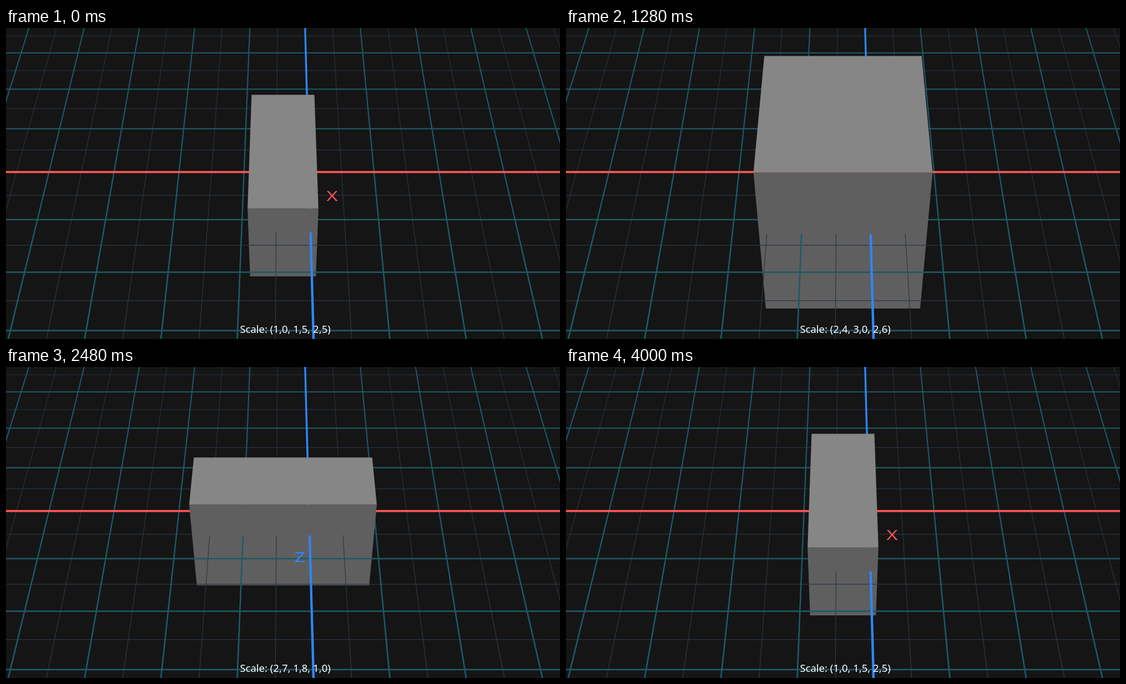
Recreate the animation shown at these times as an HTML page with a canvas. Size 998x561 px, loop 4040 ms.

```html
<!DOCTYPE html>
<html lang="en">
<head>
<meta charset="utf-8">
<title>Scaling box</title>
<style>
html, body { margin: 0; width: 100%; height: 100%; overflow: hidden; background: #151515; }
canvas { display: block; }
</style>
</head>
<body>
<canvas id="stage" width="998" height="561"></canvas>
<script>
const W = 998, H = 561, STEP = 40, STEPS = 101, PERIOD = 4000;
const ctx = document.getElementById('stage').getContext('2d');
const FONT = '"Noto Sans", "Open Sans", sans-serif';
const TEAL = '#1d5a65', THIN = '#2b3748', RED = '#ff5454', BLUE = '#2f86ff';

// Camera: pitched down 45 degrees, aimed at the ground point (0, 0, 0.5)
const FOCAL = 1751.3, DIST = 29.56, AIM_Z = 0.5;
const AXIS_X = 0.8, BOX_Y = -0.5;

function project(x, y, z) {
  const dz = z - AIM_Z;
  const k = FOCAL / (DIST - Math.SQRT1_2 * (y + dz));
  return { x: W / 2 + x * k, y: H / 2 - Math.SQRT1_2 * (y - dz) * k, k };
}

function trace(points) {
  ctx.beginPath();
  for (const p of points) ctx.lineTo(p.x, p.y);
  ctx.closePath();
}

function fill(points, color) {
  trace(points);
  ctx.fillStyle = color;
  ctx.fill();
}

// Ground lines; widths are world units
function lineAlongX(z, width, color) {
  const p = project(0, 0, z), h = width * p.k;
  ctx.fillStyle = color;
  ctx.fillRect(0, p.y - h / 2, W, h);
}

function lineAlongZ(x, width, color) {
  const h = width / 2;
  fill([project(x - h, 0, -9), project(x + h, 0, -9),
        project(x + h, 0, 8), project(x - h, 0, 8)], color);
}

function drawGround() {
  for (const odd of [1, 0]) {
    const width = odd ? 0.019 : 0.04, color = odd ? THIN : TEAL;
    for (let i = -12 + odd; i <= 12; i += 2) {
      lineAlongZ(AXIS_X + i, width, color);
      if (i > -9 && i < 8) lineAlongX(i, width, color);
    }
  }
  lineAlongX(0, 0.064, RED);
  lineAlongZ(AXIS_X, 0.065, BLUE);
}

function drawLabel(text, x, baseline, color) {
  ctx.save();
  ctx.translate(x, baseline);
  ctx.scale(1, 0.72);
  ctx.font = '500 35px ' + FONT;
  ctx.textAlign = 'center';
  ctx.fillStyle = color;
  ctx.fillText(text, 0, 0);
  ctx.restore();
}

function draw(time) {
  const angle = Math.floor(time / STEP) % STEPS * STEP / PERIOD * 2 * Math.PI;
  const scale = [0, 1, 2].map(i => 2 - Math.cos(angle + i * Math.PI / 3));
  const [sx, sy, sz] = scale;
  const edge = (y, z) => [project(-sx, BOX_Y + y, z), project(sx, BOX_Y + y, z)];
  const topBack = edge(sy, -sz), topFront = edge(sy, sz), bottom = edge(-sy, sz);
  const front = [...topFront, ...bottom.reverse()];

  ctx.fillStyle = '#151515';
  ctx.fillRect(0, 0, W, H);
  drawGround();
  drawLabel('X', 587.5, 311.8, RED);
  fill([...topBack, ...topFront.slice().reverse()], '#868686');
  fill(front, '#5f5f5f');

  // The ground ahead of the front face passes over it
  ctx.save();
  trace(front);
  ctx.clip();
  ctx.beginPath();
  ctx.rect(0, project(0, 0, sz).y, W, H);
  ctx.clip();
  drawGround();
  ctx.restore();

  // The Z label lies at depth 1.5 and emerges as the face recedes
  ctx.save();
  ctx.beginPath();
  ctx.rect(0, 0, W, Math.max(0, 339 + (1.5 - sz) * 1000));
  ctx.clip();
  drawLabel('Z', 529.3, 352.3, BLUE);
  ctx.restore();

  const values = scale.map(v => v.toFixed(1).replace('.', ','));
  ctx.font = '18.5px ' + FONT;
  ctx.textAlign = 'left';
  ctx.fillStyle = '#fff';
  ctx.fillText(`Scale: (${values.join(', ')})`, 421.4, 550.3);
}

const start = performance.now();
function tick() {
  draw(performance.now() - start);
  requestAnimationFrame(tick);
}
tick();
</script>
</body>
</html>
```
